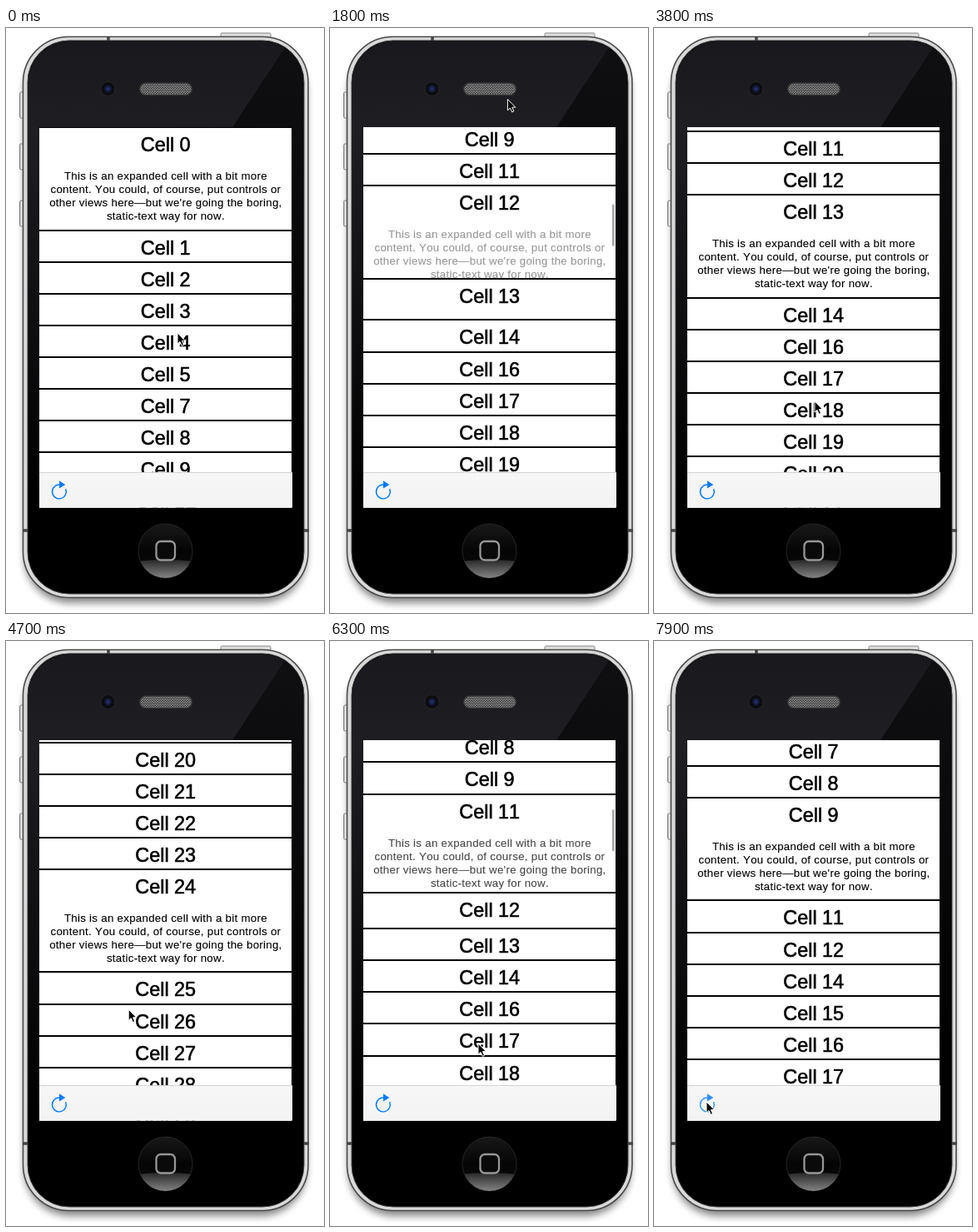
Animation of 382 by 702 pixels, one loop 8 s. Source, as an HTML page:

```html
<!DOCTYPE html>
<html lang="en">
<head>
<meta charset="utf-8">
<title>Expanding cells</title>
<style>
  html, body { margin: 0; width: 100%; height: 100%; overflow: hidden; background: #fff; }
  svg { display: block; width: 382px; height: 702px; }
  text { font-family: "Liberation Sans", Arial, sans-serif; font-kerning: none; text-anchor: middle; stroke: #000; }
  .title { font-size: 23.4px; stroke-width: .6px; }
  .body { font-size: 13.26px; letter-spacing: .3px; stroke-width: .12px; }
</style>
</head>
<body>
<svg viewBox="0 0 382 702" xmlns="http://www.w3.org/2000/svg">
  <defs>
    <linearGradient id="key">
      <stop offset="0" stop-color="#999"/><stop offset=".4" stop-color="#eee"/><stop offset="1" stop-color="#aaa"/>
    </linearGradient>
    <linearGradient id="gloss" x2="0" y2="1">
      <stop offset="0" stop-color="#18181d"/><stop offset=".2" stop-color="#1e1e23"/><stop offset="1" stop-color="#000"/>
    </linearGradient>
    <linearGradient id="shade" x2="0" y2="1">
      <stop offset="0" stop-color="#101013"/><stop offset="1" stop-color="#000"/>
    </linearGradient>
    <linearGradient id="home" x2="0" y2="1">
      <stop offset="0" stop-color="#181818"/><stop offset=".5" stop-color="#050505"/><stop offset="1" stop-color="#0c0c0c"/>
    </linearGradient>
    <linearGradient id="shine" x2="0" y2="1">
      <stop offset="0" stop-color="#2c2c2c"/><stop offset="1" stop-color="#999"/>
    </linearGradient>
    <linearGradient id="bar" x2="0" y2="1">
      <stop offset="0" stop-color="#f7f7f7"/><stop offset="1" stop-color="#f3f3f3"/>
    </linearGradient>
    <radialGradient id="lens">
      <stop offset="0" stop-color="#2a3878"/><stop offset=".5" stop-color="#161d42"/><stop offset="1" stop-color="#0a0a0e"/>
    </radialGradient>
    <pattern id="mesh" width="3" height="3" patternUnits="userSpaceOnUse">
      <rect width="3" height="3" fill="#888"/>
      <circle cx=".75" cy=".75" r=".8" fill="#2a2a2a"/><circle cx="2.25" cy="2.25" r=".8" fill="#2a2a2a"/>
    </pattern>
    <filter id="soft" x="-10%" y="-10%" width="120%" height="120%"><feGaussianBlur stdDeviation="5"/></filter>
    <clipPath id="glass"><rect x="27" y="16" width="330" height="662" rx="49"/></clipPath>
    <clipPath id="screen"><rect x="40" y="119" width="304" height="456.5"/></clipPath>
    <clipPath id="button"><circle cx="191.5" cy="627.5" r="32.5"/></clipPath>
  </defs>

  <rect x="22" y="22" width="339" height="668" rx="55" opacity=".48" filter="url(#soft)"/>
  <g fill="url(#key)" stroke="#707070" stroke-width=".8">
    <rect x="16.5" y="77" width="5" height="31" rx="1.5"/>
    <rect x="16.5" y="139" width="5" height="31" rx="1.5"/>
    <rect x="16.5" y="207" width="5" height="31" rx="1.5"/>
    <rect x="258" y="6" width="60" height="6" rx="1.5" fill="#ddd"/>
  </g>
  <rect x="20.5" y="10.5" width="342.5" height="673" rx="55" fill="#dadada" stroke="#4a4a4a" stroke-width="1.6"/>
  <path d="M20 603H27M357 603H364M123 10V16" stroke="#444" stroke-width="3.5"/>
  <rect x="26" y="15" width="332" height="664" rx="50" stroke="#444"/>
  <g clip-path="url(#glass)">
    <path d="M26 15H341L273 118V560H26Z" fill="url(#gloss)"/>
    <path d="M341 15H358V500H273V118Z" fill="url(#shade)"/>
  </g>

  <circle cx="122.5" cy="73" r="8.5" fill="#0c0c0f" stroke="#26262a"/>
  <circle cx="122.5" cy="73" r="5.5" fill="url(#lens)"/>
  <rect x="160.5" y="66" width="63" height="14.5" rx="7.2" fill="url(#mesh)" stroke="#333" stroke-width="1.5"/>

  <circle cx="191.5" cy="627.5" r="32.5" fill="url(#home)" stroke="#262626"/>
  <path d="M157 640Q191.5 636 226 640V662H157Z" fill="url(#shine)" opacity=".9" clip-path="url(#button)"/>
  <rect x="180.5" y="616" width="22.5" height="22.5" rx="5.5" fill="#0a0a0a" stroke="#969696" stroke-width="2.3"/>

  <g clip-path="url(#screen)">
    <rect x="40" y="119" width="303" height="457" fill="#fff"/>
    <g id="list"></g>
    <rect id="thumb" x="339" width="2.6" height="50" rx="1.3" opacity=".35"/>
    <rect x="40" y="533" width="304" height="43" fill="url(#bar)"/>
    <path d="M40 533.5H344" stroke="#ccc" stroke-width=".8"/>
    <g id="reload">
      <path d="M65 548.1A8.4 8.4 0 1 0 71.6 553.1" fill="none" stroke="#007aff" stroke-width="1.4"/>
      <path d="M64 543.3L71.3 548L64 552.6Z" fill="#007aff"/>
    </g>
  </g>
  <path id="cursor" d="M0 0V13.2L3 10.4L5.2 15.3L7.5 14.3L5.4 9.6H9.4Z" stroke="#fff"/>
</svg>

<script>
const LOOP = 8000, STEP = 100, COUNT = 41;
const ROW = 38.1, EXTRA = 85.4, PITCH = 30.72, TOP = 119, MID = 191.7;
const LINES = [
  "This is an expanded cell with a bit more",
  "content. You could, of course, put controls or",
  "other views here\u2014but we're going the boring,",
  "static-text way for now."
];

// Each flick glides the list to a new open cell.
const FLICKS = [
  { start: 700, end: 2500, to: 11, glide: 527 },
  { start: 3800, end: 4200, to: 21, glide: 120 },
  { start: 5700, end: 6600, to: 9, glide: 161 }
];
// start, end, x, y
const MOVES = [
  [100, 600, 214, 300], [800, 1200, 218, 95], [1200, 1400, 219, 12], [1400, 2400, 205, 196],
  [2600, 3600, 193, 448], [3800, 4000, 193, 77], [4000, 4200, 180, 405], [4500, 5000, 98, 498],
  [5200, 5600, 192, 204], [5700, 5900, 178, 483], [6700, 7100, 86, 520], [7100, 7400, 63, 553]
];

const $ = id => document.getElementById(id);
const clamp = v => Math.max(0, Math.min(1, v));
const mix = (a, b, p) => a + (b - a) * p;
const smooth = p => p * p * (3 - 2 * p);
const without = (...gone) => [...Array(COUNT).keys()].filter(n => !gone.includes(n));
const before = without(6, 10, 15), after = without(10, 13);

function add(parent, tag, attrs, text) {
  const el = document.createElementNS("http://www.w3.org/2000/svg", tag);
  for (const k in attrs) el.setAttribute(k, attrs[k]);
  if (text) el.textContent = text;
  return parent.appendChild(el);
}

const cells = without().map(n => {
  const group = add($("list"), "g", {});
  const back = add(group, "rect", { x: 40, width: 303, fill: "#fff" });
  const body = add(group, "g", {});
  LINES.forEach((s, i) => add(body, "text", { x: MID + .2, y: 62.6 + i * 16, class: "body" }, s));
  add(group, "text", { x: MID, y: 28.6, class: "title" }, "Cell " + n);
  add(group, "rect", { x: 40, y: -1, width: 303, height: 2 });
  return { group, back, body };
});

function focusAt(t) {
  let focus = 0;
  for (const { start, end, to, glide } of FLICKS) {
    if (t < start) break;
    focus = t >= end ? to : mix(focus, to, 1 - Math.exp(-(((t - start) / glide) ** 1.265)));
  }
  return focus;
}

function pointerAt(t) {
  let x = 206, y = 366;
  for (const [start, end, toX, toY] of MOVES) {
    const p = clamp((t - start) / (end - start));
    x = mix(x, toX, p);
    y = mix(y, toY, p);
  }
  return `${x} ${y}`;
}

function layout(names, focus) {
  const spots = {};
  let y = TOP - focus * PITCH;
  names.forEach((n, i) => {
    const open = Math.max(0, 1 - Math.abs(focus - i));
    spots[n] = { y, open };
    y += ROW + EXTRA * open;
  });
  return spots;
}

function draw(t) {
  const focus = focusAt(t);
  const p = smooth(clamp((t - 7500) / 400));
  const from = layout(before, focus), to = layout(after, focus);
  cells.forEach(({ group, back, body }, n) => {
    const a = from[n] || to[n], b = to[n] || from[n];
    const shown = mix(n in from, n in to, p);
    group.style.display = a && shown ? "" : "none";
    if (!a) return;
    const open = mix(a.open, b.open, p);
    group.setAttribute("transform", `translate(0 ${Math.round(mix(a.y, b.y + 2.5, p))})`);
    group.setAttribute("opacity", shown);
    back.setAttribute("height", ROW + EXTRA * open);
    body.setAttribute("opacity", clamp((open - .78) / .22));
  });

  $("thumb").setAttribute("y", 122 + .288 * focus * PITCH);
  $("thumb").style.display = FLICKS.some(f => t > f.start && t < f.end) ? "" : "none";
  $("reload").setAttribute("opacity", p ? .8 : 1);
  $("cursor").setAttribute("transform", `translate(${pointerAt(t)})`);
}

const start = performance.now();
function tick() {
  const t = (performance.now() - start) % LOOP;
  draw(Math.floor(t / STEP) * STEP);
  requestAnimationFrame(tick);
}
tick();
</script>
</body>
</html>
```
